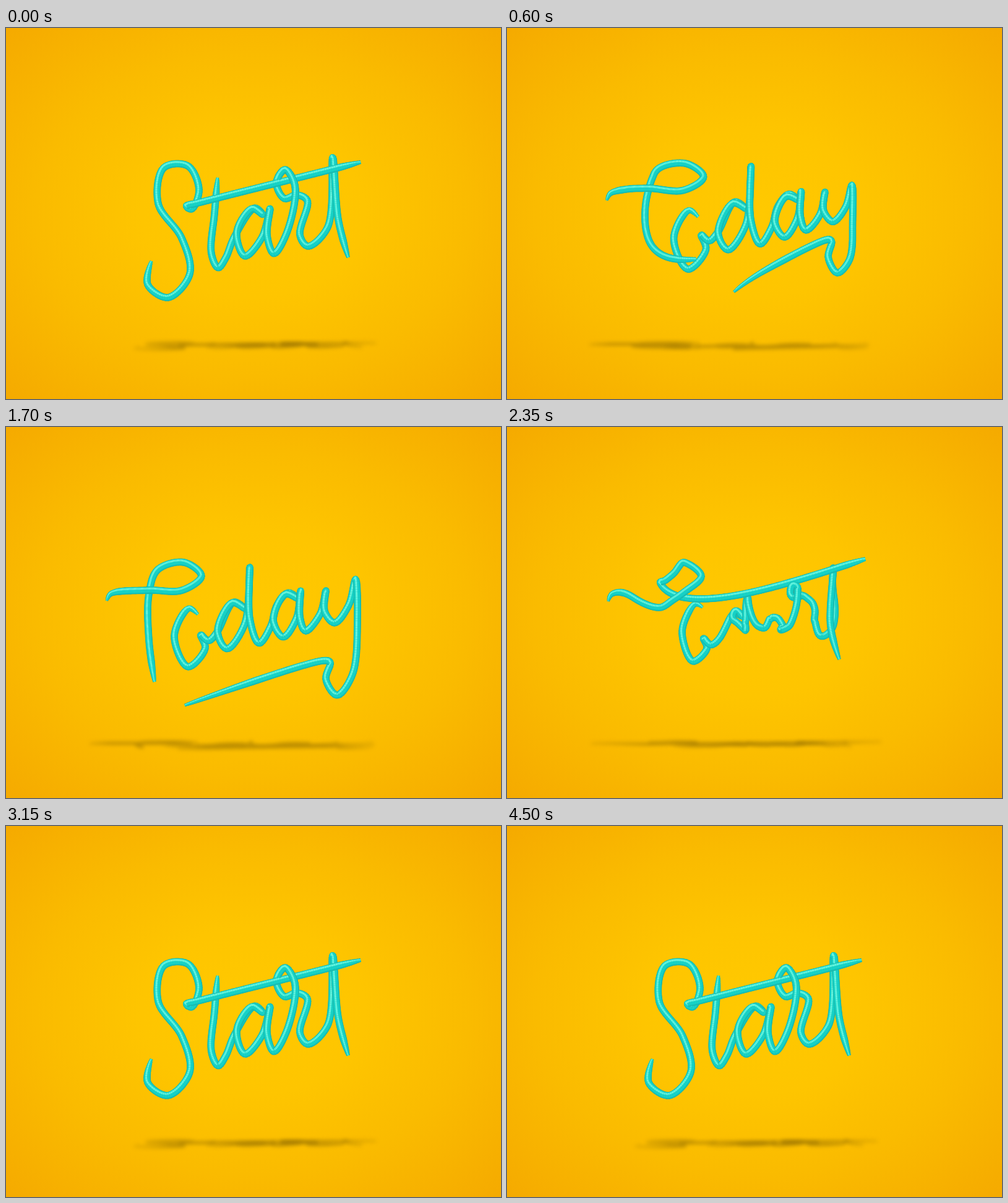
An HTML page with a canvas that plays this animation: 800 px wide and 600 px high, repeating every 4.55 s.

```html
<!DOCTYPE html>
<html lang="en">
<head>
<meta charset="utf-8">
<title>Start Today</title>
<style>
  html, body { margin: 0; width: 100%; height: 100%; overflow: hidden; }
  body { background: radial-gradient(ellipse farthest-corner at 50% 50%, #ffc900 0%, #fec500 32%, #fabb00 62%, #f5aa00 100%); }
  canvas { display: block; width: 100%; height: 100%; }
</style>
</head>
<body>
<canvas id="stage" width="800" height="600"></canvas>
<script>
const ctx = document.getElementById('stage').getContext('2d');
const LOOP = 4550, STEP = 50, MS_PER_PX = 0.79;
const LIGHT = { x: -0.42, y: -0.9 };

const mix = (a, b, p) => a + (b - a) * p;
const dist = (a, b) => Math.hypot(b.x - a.x, b.y - a.y);

// Centripetal Catmull-Rom through a few key points.
function smooth(keys) {
  const k = keys.map(([x, y]) => ({ x, y })), end = k.length - 1, pts = [k[0]];
  const gap = (a, b) => Math.sqrt(dist(a, b)) + 0.01;
  for (let i = 0; i < end; i++) {
    const a = k[Math.max(i - 1, 0)], b = k[i], c = k[i + 1], d = k[Math.min(i + 2, end)];
    const ab = gap(a, b), bc = gap(b, c), cd = gap(c, d);
    const axis = (n, u) => {
      const m = bc * ((b[n] - a[n]) / ab - (c[n] - a[n]) / (ab + bc)) + c[n] - b[n];
      const q = bc * ((d[n] - c[n]) / cd - (d[n] - b[n]) / (bc + cd)) + c[n] - b[n];
      const v = u * u, w = v * u;
      return (2 * w - 3 * v + 1) * b[n] + (w - 2 * v + u) * m + (3 * v - 2 * w) * c[n] + (w - v) * q;
    };
    for (let u = 0.05; u < 1.01; u += 0.05) pts.push({ x: axis('x', u), y: axis('y', u) });
  }
  return pts;
}

// Points at equal distances along the smoothed curve.
function even(keys, count) {
  const pts = smooth(keys), at = [0];
  for (let i = 1; i < pts.length; i++) at.push(at[i - 1] + dist(pts[i - 1], pts[i]));
  const total = at[at.length - 1];
  let i = 1;
  return Array.from({ length: count + 1 }, (_, n) => {
    const goal = total * n / count;
    while (i < at.length - 1 && at[i] < goal) i++;
    const u = (goal - at[i - 1]) / (at[i] - at[i - 1] || 1);
    return { x: mix(pts[i - 1].x, pts[i].x, u), y: mix(pts[i - 1].y, pts[i].y, u) };
  });
}

const wire = (start, today, opts) =>
  ({ start: even(start, opts.count), today: even(today, opts.count), ...opts });

// The S with the bar of the last t becomes the T.
const cap = wire(
  [[235, 377], [229, 415], [262, 436], [297, 398], [284, 340], [246, 284], [255, 226],
   [294, 223], [312, 262], [300, 293], [291, 288], [310, 283], [573, 217]],
  [[163, 281], [169, 270], [230, 264], [285, 264], [316, 241], [288, 219], [245, 231],
   [231, 270], [231, 345], [240, 412]],
  { count: 200, lag: 0, tail: () => 34 }
);

// "tart" becomes "oday" and its underline.
const word = wire(
  [[342, 242], [337, 300], [332, 365], [343, 388], [355, 372],
   [369, 338], [402, 291], [415, 302], [398, 292], [373, 330], [386, 369], [414, 338],
   [427, 291], [422, 335], [433, 365],
   [455, 328], [467, 255], [451, 229], [437, 250], [450, 276], [470, 270], [487, 279],
   [475, 335], [488, 353], [520, 322], [528, 209], [537, 310], [553, 371]],
  [[310, 303], [296, 293], [272, 338], [294, 388], [322, 358], [314, 335], [327, 346],
   [341, 332], [368, 283], [386, 294], [366, 284], [342, 330], [357, 359], [386, 318],
   [394, 225], [394, 310], [409, 350], [428, 322],
   [438, 288], [456, 268], [472, 278], [452, 270], [432, 312], [448, 340], [470, 308],
   [476, 265], [475, 308], [484, 330],
   [508, 302], [517, 264], [515, 298], [531, 317], [554, 288], [565, 246], [568, 310],
   [560, 400], [535, 434], [517, 408], [524, 380], [512, 378], [289, 450]],
  { count: 420, lag: 40, tail: p => 30 + 90 * p }
);

// Damped spring from 0 to 1, at rest before ms = 0.
function spring(ms) {
  if (ms <= 0) return 0;
  const s = ms / 1000, w = 9.1, z = 9.3;
  return 1 - Math.exp(-z * s) * (Math.cos(w * s) + z / w * Math.sin(w * s));
}

// 0 is "Start", 1 is "Today"; the wave runs right, then returns to the left.
const progress = (x, t) =>
  spring(t - 150 - (x - 225) * MS_PER_PX) - spring(t - 2070 - (575 - x) * MS_PER_PX);

const taper = (length, span) => 0.2 + 0.8 * Math.sqrt(Math.min(1, length / span));

// Morphed points with width, normal and exposure to light.
function pose(w, t) {
  const time = t - w.lag;
  const pts = w.start.map((a, i) => {
    const p = progress(a.x, time);
    return { x: mix(a.x, w.today[i].x, p), y: mix(a.y, w.today[i].y, p) };
  });
  let total = 0;
  pts.forEach((p, i) => {
    const a = pts[Math.max(i - 1, 0)], b = pts[Math.min(i + 1, w.count)];
    const len = dist(a, b) || 1;
    p.nx = (a.y - b.y) / len;
    p.ny = (b.x - a.x) / len;
    p.lit = p.nx * LIGHT.x + p.ny * LIGHT.y;
    total += dist(a, p);
    p.at = total;
  });
  const tail = w.tail(Math.max(0, progress(w.start[w.count].x, time)));
  pts.forEach(p => { p.w = 10.8 * taper(p.at, 28) * taper(total - p.at, tail); });
  return pts;
}

function line(pts, from, to, shift, width, color) {
  ctx.beginPath();
  for (let i = Math.max(from, 0); i <= Math.min(to, pts.length - 1); i++) {
    const p = pts[i], o = shift * p.lit * p.w;
    ctx.lineTo(p.x + p.nx * o, p.y + p.ny * o);
  }
  ctx.lineWidth = width;
  ctx.strokeStyle = color;
  ctx.stroke();
}

// Paints the part of the tube between two fractions of its length.
function tube(pts, from = 0, to = 1, reverse = false) {
  const last = pts.length - 1, a = Math.round(from * last), b = Math.round(to * last);
  for (let n = 0; n < b - a; n++) {
    const i = reverse ? b - 1 - n : a + n, w = pts[i].w;
    line(pts, i, i + 1, 0, w + 0.9, '#3aa58c');
    line(pts, i - 1, i + 2, 0, w, '#13bfb7');
    line(pts, i - 1, i + 2, 0.08, w * 0.82, '#18d2c6');
    line(pts, i - 1, i + 2, 0.28, w * 0.28, '#62f3dd');
  }
}

function shadow(pts) {
  const ground = pts.map(p => ({ x: 403 + (p.x - 400) * 1.13, y: 514 + (p.y - 320) * 0.045 }));
  const xs = ground.map(p => p.x);
  const fade = ctx.createLinearGradient(Math.min(...xs) - 4, 0, Math.max(...xs) + 8, 0);
  const ink = a => `rgba(105, 78, 0, ${a})`;
  fade.addColorStop(0, ink(0.1));
  fade.addColorStop(0.2, ink(0.42));
  fade.addColorStop(0.75, ink(0.42));
  fade.addColorStop(1, ink(0.1));
  ctx.beginPath();
  ground.forEach(p => ctx.lineTo(p.x, p.y));
  ctx.lineWidth = 4.5;
  ctx.strokeStyle = fade;
  ctx.stroke();
}

function draw(t) {
  ctx.clearRect(0, 0, 800, 600);
  ctx.lineJoin = 'round';
  const capPts = pose(cap, t), wordPts = pose(word, t);

  ctx.filter = 'blur(3px)';
  shadow(capPts);
  shadow(wordPts);
  ctx.filter = 'none';

  tube(wordPts);
  // The bar lies over the S, but the stem lies under the crossbar.
  tube(capPts, 0, 1, progress(300, t) > 0.5);
  // The right side of the r loop passes in front of the bar.
  tube(wordPts, 0.54, 0.6);
}

const begin = performance.now();
let shown = -1;
function tick() {
  const t = Math.floor((performance.now() - begin) % LOOP / STEP) * STEP;
  if (t !== shown) draw(shown = t);
  requestAnimationFrame(tick);
}
tick();
</script>
</body>
</html>
```
